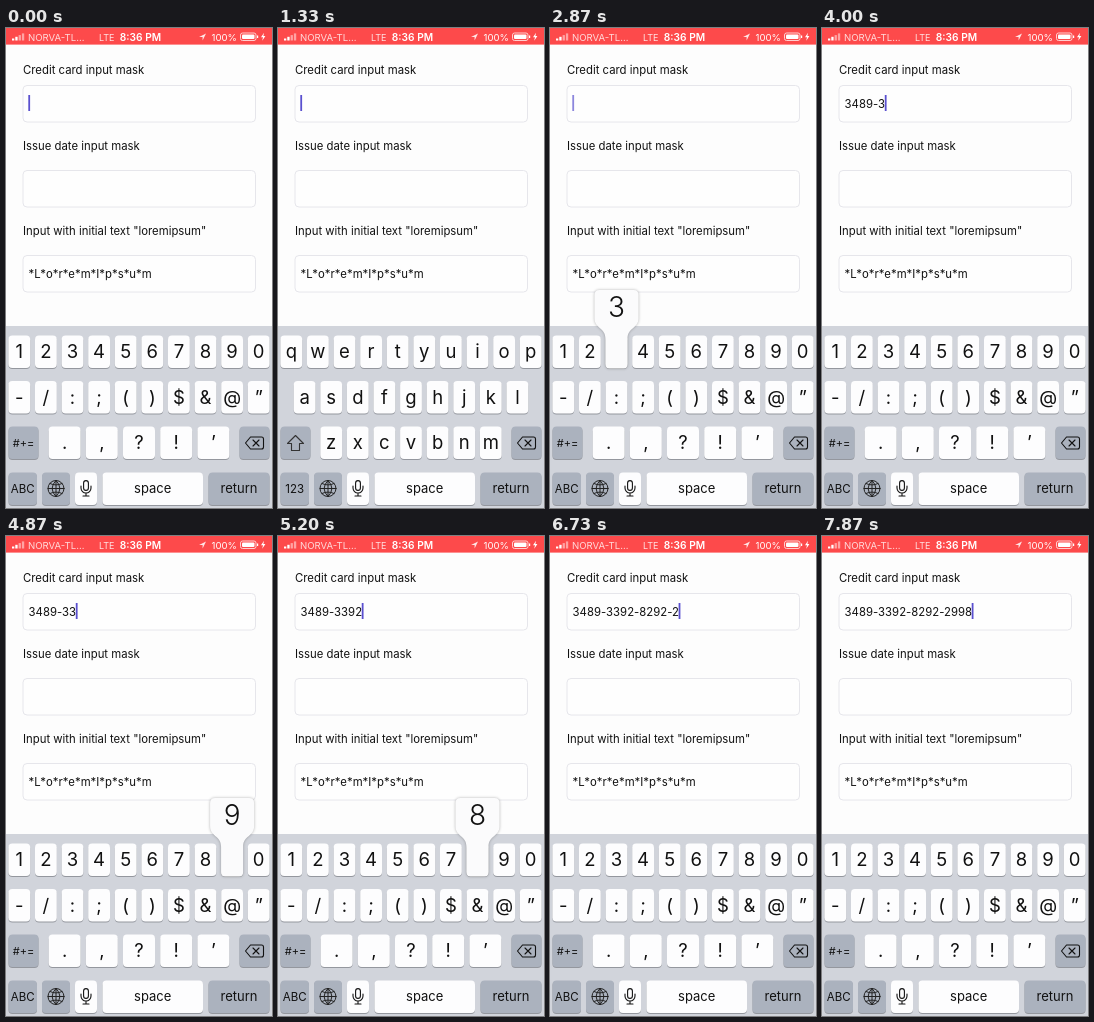
An HTML page with a canvas for the animation above (8 s loop, 266 by 480 pixels).

```html
<!DOCTYPE html>
<html lang="en">
<head>
<meta charset="utf-8">
<title>Input mask demo</title>
<style>
  html, body { margin: 0; width: 100%; height: 100%; overflow: hidden; background: #fdfdfd; }
  canvas { display: block; width: 266px; height: 480px; }
</style>
</head>
<body>
<canvas id="stage"></canvas>
<script>
const W = 266, H = 480, LOOP = 8000;
const canvas = document.getElementById('stage');
const ctx = canvas.getContext('2d');
const ratio = window.devicePixelRatio || 1;
canvas.width = W * ratio;
canvas.height = H * ratio;
ctx.scale(ratio, ratio);

const SANS = 'Inter, sans-serif';
const CARD = '3489-3392-8292-2998';
const LIGHT = '#fdfdfe', DARK = '#abb2be', INK = '#111';
const ROWS = [307.5, 353, 398.5, 444.5], PITCH = 26.6, KEY_W = 21.8, KEY_H = 32.5;
const PAGES = {
  numbers: ['1234567890', '-/:;()$&@”', '.,?!’'],
  letters: ['qwertyuiop', 'asdfghjkl', 'zxcvbnm']
};

// [time, typed characters, pressed key]
const TYPING = [
  [0, 0, ''], [2670, 0, '3'], [2980, 1, ''], [3060, 1, '4'], [3260, 2, ''], [3330, 2, '8'],
  [3800, 3, '9'], [3930, 4, '3'], [3990, 6, ''],
  [4600, 6, '3'], [4730, 7, ''], [4800, 7, '9'], [4930, 8, ''], [5000, 8, '2'],
  [5130, 9, ''], [5200, 9, '8'], [5330, 11, ''], [5400, 11, '2'], [5530, 12, ''],
  [5930, 12, '9'], [6070, 13, '2'], [6270, 14, ''], [6330, 14, '2'], [6400, 16, ''],
  [6790, 16, '9'], [7270, 17, ''], [7340, 17, '9'], [7800, 18, '8'], [7865, 19, '']
];

const ramp = (t, from, to) => Math.max(0, Math.min(1, (t - from) / (to - from)));

function text(str, x, y, size, { color = INK, align = 'left', weight = 400 } = {}) {
  ctx.font = `${weight} ${size}px ${SANS}`;
  ctx.textAlign = align;
  ctx.textBaseline = 'alphabetic';
  ctx.fillStyle = color;
  ctx.fillText(str, x, y);
}

function box(x, y, w, h, r, fill, stroke) {
  ctx.beginPath();
  ctx.roundRect(x, y, w, h, r);
  if (fill) { ctx.fillStyle = fill; ctx.fill(); }
  if (stroke) { ctx.strokeStyle = stroke; ctx.lineWidth = 1; ctx.stroke(); }
}

function icon(path, x, y, color, width) {
  ctx.save();
  ctx.translate(x, y);
  const shape = new Path2D(path);
  if (width) {
    ctx.strokeStyle = color;
    ctx.lineWidth = width;
    ctx.lineJoin = ctx.lineCap = 'round';
    ctx.stroke(shape);
  } else {
    ctx.fillStyle = color;
    ctx.fill(shape);
  }
  ctx.restore();
}

function statusBar() {
  const white = { color: '#fff' };
  ctx.fillStyle = '#fd4a4b';
  ctx.fillRect(0, 0, W, 16.6);
  for (let i = 0; i < 4; i++) {
    ctx.fillStyle = i < 2 ? '#fff' : '#ffa3a3';
    ctx.fillRect(6 + i * 3.3, 10.5 - i * 1.7, 2.3, 2 + i * 1.7);
  }
  text('NORVA-TL...', 22, 12.5, 9.6, { color: '#ffd9d9' });
  text('LTE', 93, 12.5, 9, { color: '#ffe4e4' });
  text('8:36 PM', 134.5, 12.5, 10.2, { color: '#fff', align: 'center', weight: 600 });
  icon('M7 0 L0 3.4 H3.6 V7 Z', 193, 5.5, '#ffe4e4');
  text('100%', 205.5, 12.5, 9.6, white);
  box(234.5, 5, 15.5, 7.5, 2, null, '#ffd0d0');
  box(236, 6.5, 12.5, 4.5, 1, '#fff');
  ctx.fillRect(251, 7.5, 1.2, 2.5);
  icon('M3 0 L0 4.5 H2 L1.2 8 L4.4 3.3 H2.4 Z', 255, 4.8, '#fff');
}

function field(label, baseline, y, value) {
  text(label, 17, baseline, 11.35);
  box(17, y + .5, 232.5, 36.5, 4, '#fefefe', '#e6e6eb');
  // Without contextual alternates the asterisks stay raised
  ctx.textRendering = 'optimizeSpeed';
  text(value, 22.6, y + 22.5, 11.35);
  ctx.textRendering = 'auto';
}

function form(t, typed) {
  const value = CARD.slice(0, typed);
  field('Credit card input mask', 45.5, 57, value);
  field('Issue date input mask', 122.4, 142, '');
  field('Input with initial text "loremipsum"', 207.4, 227, '*L*o*r*e*m*I*p*s*u*m');

  // The caret blinks until typing begins
  let alpha = 1;
  if (t < 2980) {
    const phase = t % 1365;
    alpha = 1 - ramp(phase, 100, 230) + ramp(phase, 820, 960);
  }
  ctx.font = `400 11.35px ${SANS}`;
  const x = 22.3 + ctx.measureText(value).width;
  ctx.globalAlpha = alpha;
  ctx.fillStyle = '#5a50cf';
  ctx.fillRect(x, 67, 1.8, 16);
  ctx.globalAlpha = 1;
}

function key(x, y, w, fill, label = '', size = 18.5) {
  box(x, y + 1, w, KEY_H, 4, '#94979e');
  box(x, y, w, KEY_H, 4, fill);
  if (label) text(label, x + w / 2, y + KEY_H / 2 + size * .36, size, { align: 'center' });
}

function keyboard(page, pressed) {
  const numeric = page === 'numbers';
  ctx.fillStyle = '#d1d4db';
  ctx.fillRect(0, 298, W, H - 298);

  PAGES[page].forEach((row, r) => {
    const wide = numeric && r === 2;
    const pitch = wide ? 37.2 : PITCH;
    const width = wide ? 32 : KEY_W;
    const start = 133 - (row.length - 1) * pitch / 2 - width / 2;
    [...row].forEach((char, i) => {
      key(start + i * pitch, ROWS[r], width, LIGHT, char === pressed ? '' : char);
    });
  });

  key(2.5, ROWS[2], 30, DARK, numeric ? '#+=' : '', 11);
  if (!numeric) icon('M0 -8 L8 0 H4 V7 H-4 V0 H-8 Z', 17.5, 415.5, '#333', 1.1);
  key(233.5, ROWS[2], 30, DARK);
  icon('M-9 0 L-4 -6 H7 Q9 -6 9 -4 V4 Q9 6 7 6 H-4 Z M-1.5 -3 L4.5 3 M4.5 -3 L-1.5 3', 248.5, 415, INK, 1.1);

  key(2.5, ROWS[3], 28.5, DARK, numeric ? 'ABC' : '123', 11.5);
  key(36, ROWS[3], 28, DARK);
  icon('M8 0 A8 8 0 1 1 -8 0 A8 8 0 1 1 8 0 M-8 0 H8 M0 -8 V8 M0 -8 Q-8 0 0 8 M0 -8 Q8 0 0 8 M-6 -5 Q0 -2 6 -5 M-6 5 Q0 2 6 5',
    50, 460.5, '#222', 1);
  key(69, ROWS[3], 22, LIGHT);
  icon('M-2.4 -5 A2.4 2.4 0 0 1 2.4 -5 V0 A2.4 2.4 0 0 1 -2.4 0 Z M-5 -2 V0 A5 5 0 0 0 5 0 V-2 M0 5 V8 M-3 8 H3',
    80, 460, INK, 1.1);
  key(96.5, ROWS[3], 100.5, LIGHT, 'space', 13);
  key(202.5, ROWS[3], 61, DARK, 'return', 13);
}

function popup(char) {
  const x = 13.3 + PAGES.numbers[0].indexOf(char) * PITCH;
  ctx.save();
  ctx.shadowColor = 'rgba(0, 0, 0, .3)';
  ctx.shadowBlur = 3 * ratio;
  icon('M-17 262 H17 Q22 262 22 267 V290 C22 301 11 299 11 311 V336 Q11 340.5 7 340.5 H-7 Q-11 340.5 -11 336 V311 C-11 299 -22 301 -22 290 V267 Q-22 262 -17 262 Z',
    x, 0, '#fbfbfc');
  ctx.restore();
  text(char, x, 288.7, 28, { align: 'center', weight: 300 });
}

function draw(t) {
  const [, typed, pressed] = TYPING.findLast(step => step[0] <= t);
  ctx.fillStyle = '#fdfdfd';
  ctx.fillRect(0, 0, W, H);
  statusBar();
  form(t, typed);

  keyboard('numbers', pressed);
  const letters = ramp(t, 870, 1060) - ramp(t, 2270, 2460);
  if (letters > 0) {
    ctx.globalAlpha = letters;
    keyboard('letters', '');
    ctx.globalAlpha = 1;
  }
  if (pressed) popup(pressed);
}

const begin = performance.now();
function tick() {
  draw((performance.now() - begin) % LOOP);
  requestAnimationFrame(tick);
}
tick();
</script>
</body>
</html>
```
